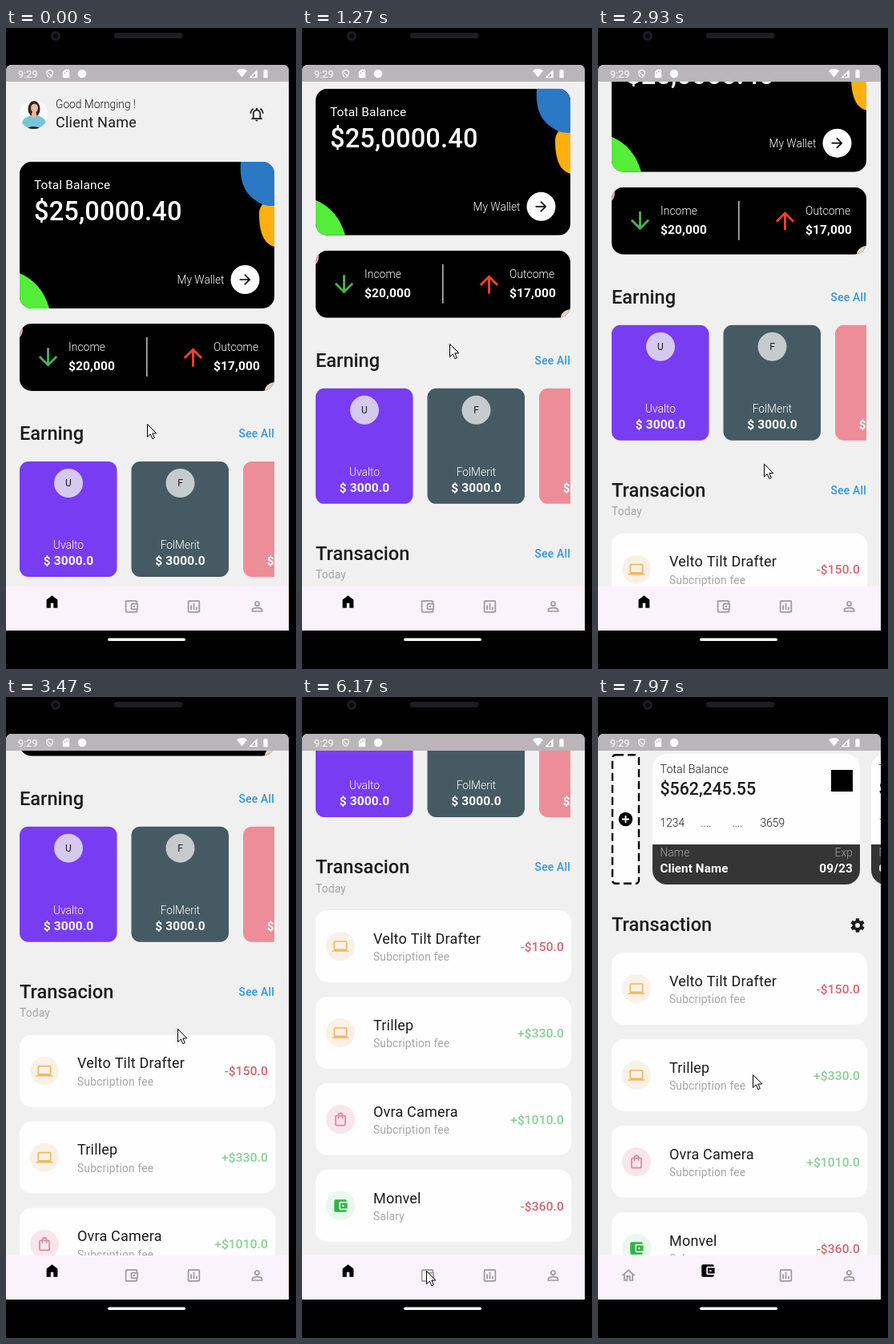
Animation of 362 by 800 pixels, one loop 8000 ms. Source, as an HTML page with a canvas:

```html
<!DOCTYPE html>
<html lang="en">
<head>
<meta charset="utf-8">
<title>Wallet app</title>
<style>
  html, body { margin: 0; width: 100%; height: 100%; overflow: hidden; background: #000; }
  canvas { display: block; }
</style>
</head>
<body>
<canvas id="stage" width="362" height="800"></canvas>
<script>
const ctx = document.getElementById('stage').getContext('2d');
const LOOP = 8000, SWITCH = 6670;
const BG = '#f1f0f0', INK = '#1b1b1d', MUTED = '#a5a4a6', PALE = '#fff', CARD = '#fefefe';

// 24-unit icons, filled even-odd
const icons = {
  homeFill: 'M4 21V9l8-6 8 6v12h-6v-7h-4v7z',
  home: 'M12 5.7l5 4.5V18h-2v-6H9v6H7v-7.8zM12 3L2 12h3v8h6v-6h2v6h6v-8h3z',
  wallet: 'M21 7.3V5a2 2 0 0 0-2-2H5a2 2 0 0 0-2 2v14a2 2 0 0 0 2 2h14a2 2 0 0 0 2-2v-2.3a2 2 0 0 0 1-1.7V9a2 2 0 0 0-1-1.7zM20 9v6h-7V9zM5 19V5h14v2h-6a2 2 0 0 0-2 2v6a2 2 0 0 0 2 2h6v2zM14.5 12a1.5 1.5 0 1 0 3 0 1.5 1.5 0 1 0-3 0z',
  walletFill: 'M21 18v1a2 2 0 0 1-2 2H5a2 2 0 0 1-2-2V5a2 2 0 0 1 2-2h14a2 2 0 0 1 2 2v1h-9a2 2 0 0 0-2 2v8a2 2 0 0 0 2 2zM12 16h10V8H12zM14.5 12a1.5 1.5 0 1 0 3 0 1.5 1.5 0 1 0-3 0z',
  chart: 'M7 10h2v7H7zM11 7h2v10h-2zM15 13h2v4h-2zM5 5h14v14H5zM5 3a2 2 0 0 0-2 2v14a2 2 0 0 0 2 2h14a2 2 0 0 0 2-2V5a2 2 0 0 0-2-2z',
  person: 'M12 5.9a2.1 2.1 0 1 1 0 4.2 2.1 2.1 0 0 1 0-4.2zM12 4a4 4 0 1 0 0 8 4 4 0 0 0 0-8zM12 14.9c3 0 6.1 1.5 6.1 2.1v1.1H5.9V17c0-.6 3.1-2.1 6.1-2.1zM12 13c-2.7 0-8 1.3-8 4v3h16v-3c0-2.7-5.3-4-8-4z',
  laptop: 'M20 18a2 2 0 0 0 2-2V6a2 2 0 0 0-2-2H4a2 2 0 0 0-2 2v10a2 2 0 0 0 2 2H0v2h24v-2zM4 6h16v10H4z',
  bag: 'M18 6h-2a4 4 0 0 0-8 0H6a2 2 0 0 0-2 2v12a2 2 0 0 0 2 2h12a2 2 0 0 0 2-2V8a2 2 0 0 0-2-2zM12 4a2 2 0 0 1 2 2h-4a2 2 0 0 1 2-2zM18 20H6V8h2v2a1 1 0 0 0 2 0V8h4v2a1 1 0 0 0 2 0V8h2z',
  bell: 'M12 22a2 2 0 0 0 2-2h-4a2 2 0 0 0 2 2zM18 16v-5c0-3-1.6-5.6-4.5-6.3V4a1.5 1.5 0 0 0-3 0v.7C7.6 5.4 6 8 6 11v5l-2 2v1h16v-1zM16 17H8v-6c0-2.5 1.5-4.5 4-4.5s4 2 4 4.5zM7.6 4.1 6.2 2.7A10.4 10.4 0 0 0 2 10.5h2a8.5 8.5 0 0 1 3.6-6.4zM20 10.5h2a10.4 10.4 0 0 0-4.1-7.8l-1.5 1.4a8.5 8.5 0 0 1 3.6 6.4z',
  arrow: 'M4 11h12.2l-5.6-5.6L12 4l8 8-8 8-1.4-1.4 5.6-5.6H4z',
  shield: 'M12 2 4 5v6c0 5 3.4 9.7 8 11 4.6-1.3 8-6 8-11V5zM12 4.5 18 6.7V11c0 4-2.5 7.5-6 8.8C8.5 18.5 6 15 6 11V6.7zM8 8l8 8-1.5 1.5-8-8z',
  sdCard: 'M18 2h-8L4 8v12a2 2 0 0 0 2 2h12a2 2 0 0 0 2-2V4a2 2 0 0 0-2-2zM8 8h2v4H8zM12 5h2v4h-2zM16 5h2v4h-2z',
  wifi: 'M12 21 24 6.5a18 18 0 0 0-24 0z',
  signal: 'M2 22h20V2zM17 10v10H8z',
  battery: 'M15.7 4H14V2h-4v2H7v18h10V4z'
};
for (const name in icons) icons[name] = new Path2D(icons[name]);

const earnings = [
  { x: 17, color: '#783cf2', badge: '#d5c9ee', name: 'Uvalto' },
  { x: 156.5, color: '#455a62', badge: '#c5cacc', name: 'FolMerit' },
  { x: 296, color: '#ec8d98', badge: '#f6d4d8', name: '' }
];
const payments = [
  ['Velto Tilt Drafter', 'Subcription fee', '-$150.0', 'laptop', '#efb95c', '#faf1e6'],
  ['Trillep', 'Subcription fee', '+$330.0', 'laptop', '#efb95c', '#faf1e6'],
  ['Ovra Camera', 'Subcription fee', '+$1010.0', 'bag', '#dc88a2', '#f9e6ea'],
  ['Monvel', 'Salary', '-$360.0', 'walletFill', '#2fb544', '#e8f8ec']
];

// Keys: [time, value, power]; power above 1 slows towards the key
const homeScroll = [[150, 0], [1270, 91], [1550, 128], [2270, 170, 2], [2930, 170], [3250, 278.5], [4470, 535, 2.5]];
const walletDrop = [[7730, 60], [7970, 0]];
const cursorX = [[0, 176], [1270, 184], [1550, 187], [2270, 207, 2], [2930, 207], [3280, 214], [5500, 214], [6170, 155, 2], [6800, 155], [7430, 193, 2]];
const cursorY = [[0, 494], [1270, 394], [1550, 357], [2270, 544, 2], [2930, 544], [3280, 414], [5500, 414], [6170, 716, 2], [6800, 716], [7430, 541, 2], [7730, 541], [7970, 471]];

function track(keys, t) {
  const next = keys.findIndex(key => key[0] > t);
  if (next === 0) return keys[0][1];
  if (next < 0) return keys[keys.length - 1][1];
  const [t0, a] = keys[next - 1], [t1, b, power = 1] = keys[next];
  return a + (b - a) * (1 - (1 - (t - t0) / (t1 - t0)) ** power);
}

function text(str, x, y, size, color, weight = 400, spacing = 0.15, align = 'left') {
  ctx.font = `${weight} ${size}px Roboto, sans-serif`;
  ctx.letterSpacing = spacing + 'px';
  ctx.textAlign = align;
  ctx.fillStyle = color;
  ctx.fillText(str, x, y);
}
function box(x, y, w, h, r, color) {
  ctx.beginPath();
  ctx.roundRect(x, y, w, h, r);
  ctx.fillStyle = color;
  ctx.fill();
}
function oval(x, y, rx, color, ry = rx) {
  ctx.beginPath();
  ctx.ellipse(x, y, rx, ry, 0, 0, 7);
  ctx.fillStyle = color;
  ctx.fill();
}
function shape(path, color) {
  ctx.fillStyle = color;
  ctx.fill(new Path2D(path));
}
function icon(name, x, y, size, color, turn = 0) {
  ctx.save();
  ctx.translate(x, y);
  ctx.rotate(turn);
  ctx.scale(size / 24, size / 24);
  ctx.translate(-12, -12);
  ctx.fillStyle = color;
  ctx.fill(icons[name], 'evenodd');
  ctx.restore();
}
function clipped(x, y, w, h, r, draw) {
  ctx.save();
  ctx.beginPath();
  ctx.roundRect(x, y, w, h, r);
  ctx.clip();
  draw();
  ctx.restore();
}

function header() {
  clipped(16.5, 90, 36, 36, 18, () => {
    box(16, 89, 37, 38, 0, '#fbfbfb');
    oval(35, 101, 7.5, '#2c2320', 10);
    oval(35.5, 100, 4.5, '#efb7a0', 5.5);
    oval(35, 119, 15, '#78c6d8', 10);
    oval(35, 108, 3, '#efb7a0', 4);
    oval(34.5, 127, 9, '#242424', 4);
  });
  text('Good Mornging !', 62, 100, 13.75, INK, 300, 0);
  text('Client Name', 62, 123.5, 18, INK, 400, 0.25);
  icon('bell', 313, 108, 20.6, INK);
}

function balanceCard() {
  clipped(17, 167, 318, 183, 15, () => {
    box(17, 167, 318, 183, 0, '#000');
    shape('M335 219C322 215 316 222 316 232 316 255 322 270 335 273z', '#ffb010');
    shape('M293 167C291 195 300 210 318 219 326 223 335 222 335 222V167z', '#2b78c4');
    shape('M17 306Q45 318 54 350H17z', '#54ee38');
  });
  text('Total Balance', 35, 201, 15.46, PALE);
  text('$25,0000.40', 35, 240, 32.6, PALE, 500);
  text('My Wallet', 213.5, 319, 13.75, PALE, 300, 0);
  oval(298.5, 314, 18, '#fff');
  icon('arrow', 298.5, 314, 20.6, '#000');
}

function flowCard() {
  clipped(17, 369, 318, 84, 15, () => {
    box(17, 369, 318, 84, 0, '#000');
    oval(14, 376, 7, '#eda3b8', 11);
    oval(336, 453, 13, '#e2d3c4', 11);
  });
  icon('arrow', 52.5, 411, 35, '#4caf50', Math.PI / 2);
  icon('arrow', 233.5, 411, 35, '#f0402f', -Math.PI / 2);
  box(175, 386, 1.6, 49, 0, '#b9b9b9');
  text('Income', 78, 403, 13.75, PALE, 300, 0.1);
  text('$20,000', 78, 427, 15.46, PALE, 700);
  text('Outcome', 259, 403, 13.75, PALE, 300, 0.1);
  text('$17,000', 259, 427, 15.46, PALE, 700);
}

function section(title, y) {
  text(title, 17, y, 23.6, INK, 500, 0);
}
function seeAll(y) {
  text('See All', 335, y, 13.75, '#2f95e2', 500, 0.25, 'right');
}

function earningCards() {
  clipped(17, 530, 318, 170, 0, () => {
    for (const { x, color, badge, name } of earnings) {
      const mid = x + 61;
      box(x, 541, 121.5, 144, 11, color);
      oval(mid, 568, 18, badge);
      text(name.charAt(0), mid, 572, 12, INK, 400, 0, 'center');
      text(name, mid, 650, 13.75, PALE, 300, 0, 'center');
      text('$ 3000.0', mid, 670, 15.46, PALE, 700, 0.15, 'center');
    }
  });
}

function paymentList(top) {
  payments.forEach(([title, note, amount, glyph, tint, halo], i) => {
    const y = top + i * 108;
    box(17, y, 319, 90, 15, CARD);
    oval(48, y + 45, 18, halo);
    icon(glyph, 48, y + 45, 20.6, tint);
    text(title, 89, y + 41.5, 18, INK, 400, 0.2);
    text(note, 89, y + 63, 13.75, MUTED, 400, 0.2);
    text(amount, 327, y + 50.5, 15.46, amount[0] === '-' ? '#d9626c' : '#86cf92', 500, 0.15, 'right');
  });
}

function homePage() {
  header();
  balanceCard();
  flowCard();
  section('Earning', 514);
  seeAll(511);
  earningCards();
  section('Transacion', 755);
  seeAll(752);
  text('Today', 17, 778.5, 13.75, MUTED, 400, 0.2);
  paymentList(801);
}

function bankCard(x) {
  clipped(x, 71, 259, 163, 18, () => {
    box(x, 71, 259, 163, 0, CARD);
    box(x, 184, 259, 50, 0, '#353535');
  });
  const left = x + 9.5, right = x + 250;
  text('Total Balance', left, 95, 14.2, INK, 300, 0.1);
  text('$562,245.55', left, 121.5, 21.3, INK, 500, 0);
  box(x + 223, 91, 27, 27, 0, '#000');
  ['1234', '....', '....', '3659'].forEach((part, i) =>
    text(part, left + [0, 51, 90, 125][i], 161.5, 13.75, INK, 300, 0));
  text('Name', left, 198.5, 13.75, '#a8a8a8', 300, 0.1);
  text('Exp', right, 198.5, 13.75, '#a8a8a8', 300, 0.1, 'right');
  text('Client Name', left, 219, 15.2, PALE, 700, 0.1);
  text('09/23', right, 219, 15.46, PALE, 700, 0.1, 'right');
}

function gear(x, y) {
  ctx.save();
  ctx.translate(x, y);
  ctx.strokeStyle = INK;
  ctx.lineWidth = 3.6;
  ctx.beginPath();
  ctx.arc(0, 0, 4.8, 0, 7);
  ctx.stroke();
  ctx.fillStyle = INK;
  for (let i = 0; i < 6; i++) {
    ctx.fillRect(-2.2, -8.7, 4.4, 4);
    ctx.rotate(Math.PI / 3);
  }
  ctx.restore();
}

function walletPage() {
  box(17, 71, 35, 163, 4, CARD);
  ctx.strokeStyle = '#000';
  ctx.lineWidth = 2.4;
  ctx.setLineDash([10, 5]);
  ctx.beginPath();
  ctx.roundRect(18, 72.2, 33, 160.6, 4);
  ctx.stroke();
  ctx.setLineDash([]);
  oval(34.5, 152.5, 8.7, '#000');
  box(30, 151.6, 9, 1.8, 0, '#fff');
  box(33.6, 148, 1.8, 9, 0, '#fff');
  bankCard(68);
  bankCard(341);
  section('Transaction', 292);
  gear(324, 285);
  paymentList(319);
}

function navBar(t) {
  box(0, 697, 353, 55, 0, '#fbf3fb');
  const u = Math.min(1, Math.max(0, (t - SWITCH) / 200));
  const k = u * u * (3 - 2 * u);
  const onWallet = t >= SWITCH;
  const idle = '#9b989c';
  icon(onWallet ? 'home' : 'homeFill', 57.5 - 19.5 * k, 716 + 6 * k, 20.6, onWallet ? idle : '#000');
  icon(onWallet ? 'walletFill' : 'wallet', 156.5 - 19.5 * k, 722 - 6 * k, 20.6, onWallet ? '#000' : idle);
  icon('chart', 234.5, 722, 20.6, idle);
  icon('person', 313.5, 722, 20.6, idle);
}

function statusBar() {
  box(0, 46, 353, 21, 0, '#bab5b9');
  text('9:29', 15, 61.5, 12.6, '#fff', 400, 0.1);
  icon('shield', 54.5, 57, 12.5, '#fff');
  icon('sdCard', 75, 57, 12.5, '#fff');
  oval(95, 57, 5.3, '#fff');
  icon('wifi', 294.5, 56.5, 13, '#fff');
  icon('signal', 308.5, 57, 12.5, '#fff');
  icon('battery', 324, 57, 12.5, '#fff');
}

function cursor(x, y) {
  const arrow = new Path2D('M.5.5V16.5L4.3 13 6.8 18.8 9.3 17.7 6.8 12H11.8z');
  ctx.save();
  ctx.translate(x, y);
  ctx.fillStyle = '#fff';
  ctx.strokeStyle = '#000';
  ctx.lineWidth = 1;
  ctx.fill(arrow);
  ctx.stroke(arrow);
  ctx.restore();
}

function render(now) {
  const t = now % LOOP;
  box(0, 0, 362, 800, 0, '#000');
  oval(62, 10, 6, '#1d1d25');
  oval(62, 10, 3, '#08080c');
  box(135, 6, 85, 7, 3, '#1d1d22');
  box(127, 761.5, 97, 3.4, 1.7, '#fff');
  clipped(0, 46, 353, 706, [7, 7, 0, 0], () => {
    box(0, 46, 353, 706, 0, BG);
    ctx.save();
    if (t < SWITCH) {
      ctx.translate(0, -track(homeScroll, t));
      homePage();
    } else {
      ctx.translate(0, track(walletDrop, t));
      walletPage();
    }
    ctx.restore();
    navBar(t);
    statusBar();
  });
  cursor(track(cursorX, t), track(cursorY, t));
}

const start = performance.now();
(function tick() {
  render(performance.now() - start);
  requestAnimationFrame(tick);
})();
</script>
</body>
</html>
```
